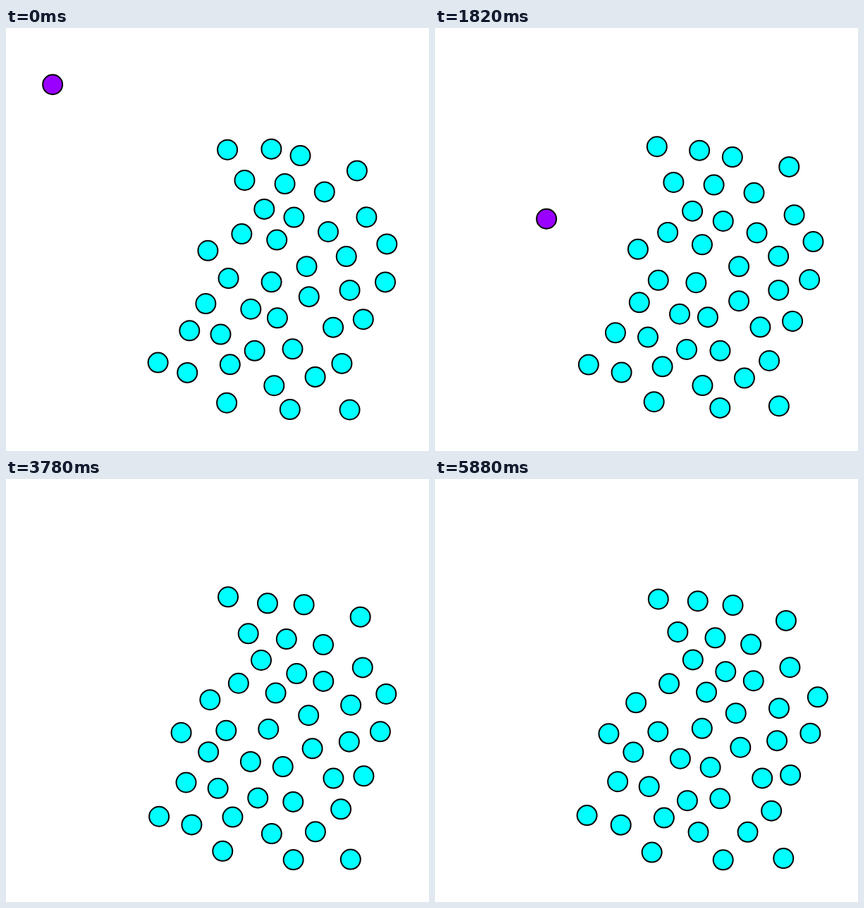
Recreate the animation shown at these times as an HTML page. Size 600 px wide and 600 px high, loop 5950 ms.

```html
<!DOCTYPE html>
<html lang="en">
<head>
<meta charset="utf-8">
<title>Joining particle</title>
<style>
  html, body { margin: 0; width: 100%; height: 100%; overflow: hidden; background: #fff; }
  svg { display: block; width: 100%; height: 100%; }
  circle { stroke: #000; stroke-width: 2; fill: #0ff; }
</style>
</head>
<body>
<svg id="stage" viewBox="0 0 600 600"></svg>
<script>
const LOOP = 5950, STEP = 70, RADIUS = 14, JOIN_TIME = 3360;

// Resting places of the cluster
const homes = [
  [314, 170], [374, 173], [421, 182], [500, 199], [340, 215],
  [394, 225], [450, 232], [364, 255], [411, 272], [508, 264],
  [334, 291], [383, 303], [455, 288], [539, 308], [287, 318],
  [428, 336], [486, 325], [317, 355], [375, 358], [534, 358],
  [286, 391], [343, 401], [431, 384], [486, 372], [389, 410],
  [506, 418], [460, 423], [259, 430], [302, 438], [355, 457],
  [409, 454], [215, 474], [262, 490], [320, 481], [377, 503],
  [440, 499], [479, 473], [309, 530], [406, 542], [491, 541]
];

// Route of the newcomer: time, x, y, share of wobble
const route = [
  [0, 67, 78, 0.5], [1050, 68, 77, 0.5], [1260, 79, 147, 0],
  [1330, 89, 178, 0], [1890, 168, 284, 0], [2310, 216, 325, 0],
  [2590, 236, 343, 0], [2940, 246, 350, 0], [3500, 247, 360, 1],
  [LOOP, 247, 361, 1]
];

let seed = 20731;
function random() {
  seed = (seed * 16807) % 2147483647;
  return seed / 2147483647;
}

function makeWobble() {
  const waves = [[3.2, 1500, 1300], [1.8, 600, 600]].map(([size, period, spread]) => ({
    size,
    speed: 2 * Math.PI / (period + spread * random()),
    phase: 2 * Math.PI * random()
  }));
  return t => waves.reduce((sum, w) => sum + w.size * Math.sin(w.speed * t + w.phase), 0);
}

function along(points, t) {
  const i = Math.max(1, points.findIndex(p => p[0] >= t));
  const a = points[i - 1], b = points[i];
  const k = (t - a[0]) / (b[0] - a[0]);
  return a.slice(1).map((v, n) => v + (b[n + 1] - v) * k);
}

function makeParticle(place) {
  const node = document.createElementNS("http://www.w3.org/2000/svg", "circle");
  node.setAttribute("r", RADIUS);
  stage.append(node);
  return { node, place, wobbleX: makeWobble(), wobbleY: makeWobble() };
}

const stage = document.getElementById("stage");
const particles = homes.map(([x, y]) => makeParticle(() => [x, y, 1]));
const newcomer = makeParticle(t => along(route, t));
particles.push(newcomer);

function draw(t) {
  for (const { node, place, wobbleX, wobbleY } of particles) {
    const [x, y, share] = place(t);
    node.setAttribute("cx", (x + share * wobbleX(t)).toFixed(2));
    node.setAttribute("cy", (y + share * wobbleY(t)).toFixed(2));
  }
  newcomer.node.style.fill = t < JOIN_TIME ? "#90f" : "#0ff";
}

const start = performance.now();
function tick() {
  const t = (performance.now() - start) % LOOP;
  draw(Math.floor(t / STEP) * STEP);
  requestAnimationFrame(tick);
}
tick();
</script>
</body>
</html>
```
